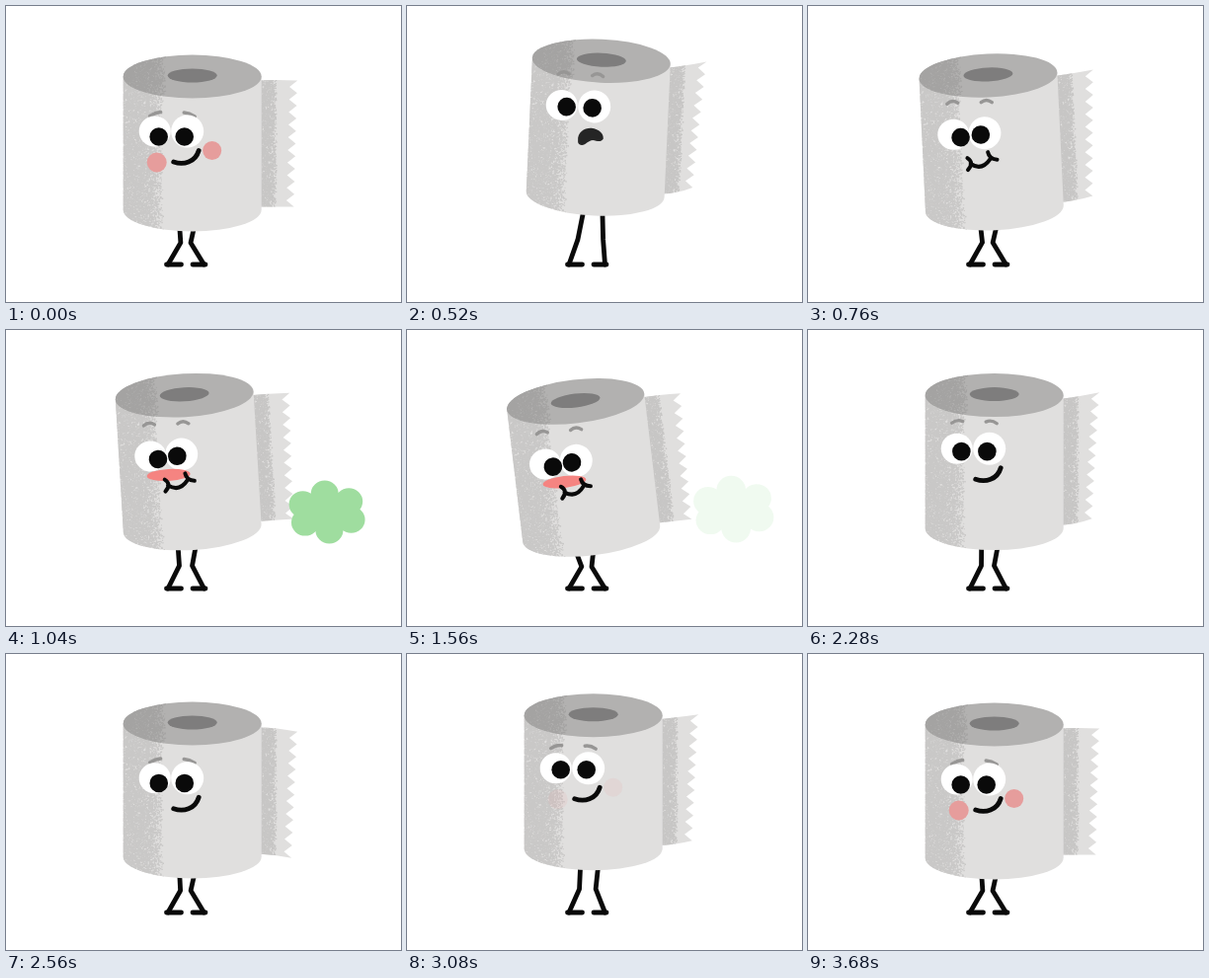
These frames come from a looping animation (400x300 px, 3.72 s). An HTML page with a canvas:

```html
<!DOCTYPE html>
<html lang="en">
<head>
<meta charset="utf-8">
<title>Paper roll</title>
<style>
html, body { margin: 0; width: 100%; height: 100%; overflow: hidden; background: #fff; }
canvas { display: block; width: 400px; height: 300px; }
</style>
</head>
<body>
<canvas id="stage" width="400" height="300"></canvas>
<script>
const ctx = document.getElementById('stage').getContext('2d');
const LOOP = 3720, STEP = 40, INK = '#0a0a0a';

const mix = (a, b, k) => a + (b - a) * k;

function ramp(t, a, b) {
  const k = Math.min(1, Math.max(0, (t - a) / (b - a)));
  return k * k * (3 - 2 * k);
}

// Rises from a to b, holds, falls from c to d
const pulse = (t, a, b, c, d) => ramp(t, a, b) * (1 - ramp(t, c, d));
const hop = (t, start, peak, end) => pulse(t, start, peak, peak, end);

const baseY = t => 206.5
  - 18 * hop(t, 120, 440, 820)
  - 5.5 * hop(t, 820, 1040, 1300)
  - 12.5 * hop(t, 1600, 2040, 2480)
  - 12 * hop(t, 2480, 2920, 3440);

function poseAt(t) {
  const shock = pulse(t, 120, 420, 580, 800);
  const push = pulse(t, 560, 820, 1660, 1900);
  const strain = pulse(t, 1060, 1400, 1600, 1800);
  const alert = pulse(t, 120, 420, 2160, 2470);
  const calm = pulse(t, 2480, 2920, 3100, 3440);
  return {
    x: 188.7 + 2 * shock - 2 * strain,
    y: baseY(t),
    tilt: 2.6 * shock - 3.4 * push - 3.4 * strain,
    lift: 1.2 * (baseY(t - 60) - baseY(t + 80)),
    brow: -14 * alert - 4 * calm,
    faceY: 6 * push - 7 * shock - 2 * (alert + calm),
    lookX: alert + calm,
    lookY: 5.5 - 4 * (alert + calm),
    cross: push
  };
}

let seed = 7;
function rnd() {
  seed = (seed * 16807) % 2147483647;
  return seed / 2147483647;
}

// Grain that thins out from left to right
function grain(x, y, w, h, power) {
  const path = new Path2D();
  for (let i = 0; i < w * h * 1.7; i++) {
    const u = rnd(), v = rnd(), s = 0.9 + rnd() * 0.7;
    if (rnd() > Math.pow(u, power)) path.rect(x + u * w, y + v * h, s, s);
  }
  return path;
}

function ovals(list) {
  const path = new Path2D();
  for (const [x, y, rx, ry] of list) {
    path.moveTo(x + rx, y);
    path.ellipse(x, y, rx, ry, 0, 0, Math.PI * 2);
  }
  return path;
}

const body = new Path2D('M-70-135V0A70 22 0 0 0 70 0V-135Z');
const lid = ovals([[0, -135, 70, 22]]);
const hole = ovals([[0, -136, 25, 7]]);
const lobes = Array.from({ length: 6 }, (_, i) => {
  const a = (i * 60 - 95) * Math.PI / 180;
  return [Math.cos(a) * 27, Math.sin(a) * 18.5, 14, 13.5];
});
const cloud = ovals([[0, 0, 30, 21], ...lobes]);
const bodyGrain = grain(-71, -135, 41, 160, 3);
const lidGrain = grain(-71, -158, 44, 46, 3);
const flapGrain = grain(68, -140, 17, 150, 4);

function fill(path, color) {
  ctx.fillStyle = color;
  ctx.fill(path);
}

function textured(path, color, dots, shade) {
  fill(path, color);
  ctx.save();
  ctx.clip(path);
  fill(dots, shade);
  ctx.restore();
}

function line(d, color, width) {
  ctx.strokeStyle = color;
  ctx.lineWidth = width;
  ctx.stroke(new Path2D(d));
}

const oval = (x, y, rx, ry, color) => fill(ovals([[x, y, rx, ry]]), color);

function drawLegs({ x, y, tilt }) {
  const u = (207 - y) / 16, hip = y + 16, knee = 240 - 3 * u;
  line(`M${x - 13 + tilt / 2} ${hip}L${177 - 4 * u} ${knee}L164 262`, INK, 4.8);
  line(`M${x + 2 + 5 * u} ${hip}L${187 + 11 * u * u} ${knee}L200.5 262`, INK, 4.8);
  line('M162.5 262H177.5M189 262H202', INK, 4.8);
}

function drawFlap(lift) {
  const top = -131 + lift, end = -3 + lift, teeth = 10;
  const low = 103 - Math.abs(lift) * 0.6;
  const path = new Path2D();
  path.moveTo(66, -131);
  path.quadraticCurveTo(84, -132 + lift * 0.2, 106.5, top);
  for (let i = 1; i <= teeth * 2; i++) {
    const k = i / (teeth * 2);
    path.lineTo(mix(106.5, low, k) - (i % 2) * 8, mix(top, end, k));
  }
  path.quadraticCurveTo(84, -3 + lift * 0.2, 66, -3);
  path.closePath();
  textured(path, '#e0dfde', flapGrain, '#c7c6c5');
}

function drawBrow(x, y, lift, side) {
  const slope = 2 + lift / 8, arch = 1.6 * (3 - slope), m = y + lift;
  line(`M${x - 5.5} ${m + slope * side}Q${x} ${m - arch} ${x + 5.5} ${m - slope * side}`, '#979695', 3.4);
}

function drawMouth(t) {
  if (t >= 240 && t < 760) {
    fill(new Path2D('M-20-44C-21-53-14-57.5-7-57.5C1-57 6-52 5.5-47C3-43-1-45-5-45.5C-10-45-12-40-16-40C-19-40-20-42-20-44Z'), '#252525');
  } else if (t >= 760 && t < 1720) {
    line('M-22-49Q-11-41-2-53M-25-55Q-18-50-25-43M-4-60Q-3-53 5-52', INK, 4);
  } else {
    line('M-19-48.5C-9-45 3-48 6.5-60', INK, 4.8);
  }
}

function drawFace(t, { faceY, lookX, lookY, brow, cross }) {
  ctx.save();
  ctx.translate(0, faceY);
  drawBrow(-37.5, -97, brow, 1);
  drawBrow(-3, -96.5, brow, -1);
  oval(-38, -79.5, 16, 15.5, '#fff');
  oval(-5 - 1.5 * cross, -79.5, 16.5, 16.5, '#fff');
  oval(-34 + lookX + 2.5 * cross, -79.5 + lookY + 2 * cross, 9.3, 9.3, INK);
  oval(-8 + lookX - 4 * cross, -79.5 + lookY, 9.3, 9.3, INK);

  ctx.globalAlpha = 1 - pulse(t, 40, 280, 2960, 3480);
  oval(-36, -48, 10, 10, '#e69d9c');
  oval(20, -60, 9.5, 9.5, '#e69d9c');
  ctx.globalAlpha = pulse(t, 760, 920, 1560, 1720);
  oval(-20.8, -59.4, 22, 6, '#f58481');
  ctx.globalAlpha = 1;
  drawMouth(t);
  ctx.restore();
}

function drawCloud(t) {
  const grow = ramp(t, 760, 1020), drift = ramp(t, 1000, 1640);
  const size = grow + 0.06 * drift;
  ctx.save();
  ctx.globalAlpha = 1 - ramp(t, 1260, 1660);
  ctx.translate(mix(288, 325, grow) + 6 * drift, mix(194, 184.5, grow) - 3 * drift);
  ctx.scale(size, size);
  fill(cloud, '#9fdd9f');
  ctx.restore();
}

function draw(t) {
  const pose = poseAt(t);
  ctx.fillStyle = '#fff';
  ctx.fillRect(0, 0, 400, 300);
  ctx.lineCap = ctx.lineJoin = 'round';
  drawLegs(pose);
  ctx.save();
  ctx.translate(pose.x, pose.y);
  ctx.rotate(pose.tilt * Math.PI / 180);
  drawFlap(pose.lift);
  textured(body, '#e0dfde', bodyGrain, '#c9c8c7');
  textured(lid, '#b2b1b0', lidGrain, '#a4a3a2');
  fill(hole, '#7e7d7d');
  drawFace(t, pose);
  ctx.restore();
  drawCloud(t);
}

function tick() {
  draw(Math.floor(performance.now() % LOOP / STEP) * STEP);
  requestAnimationFrame(tick);
}
tick();
</script>
</body>
</html>
```
